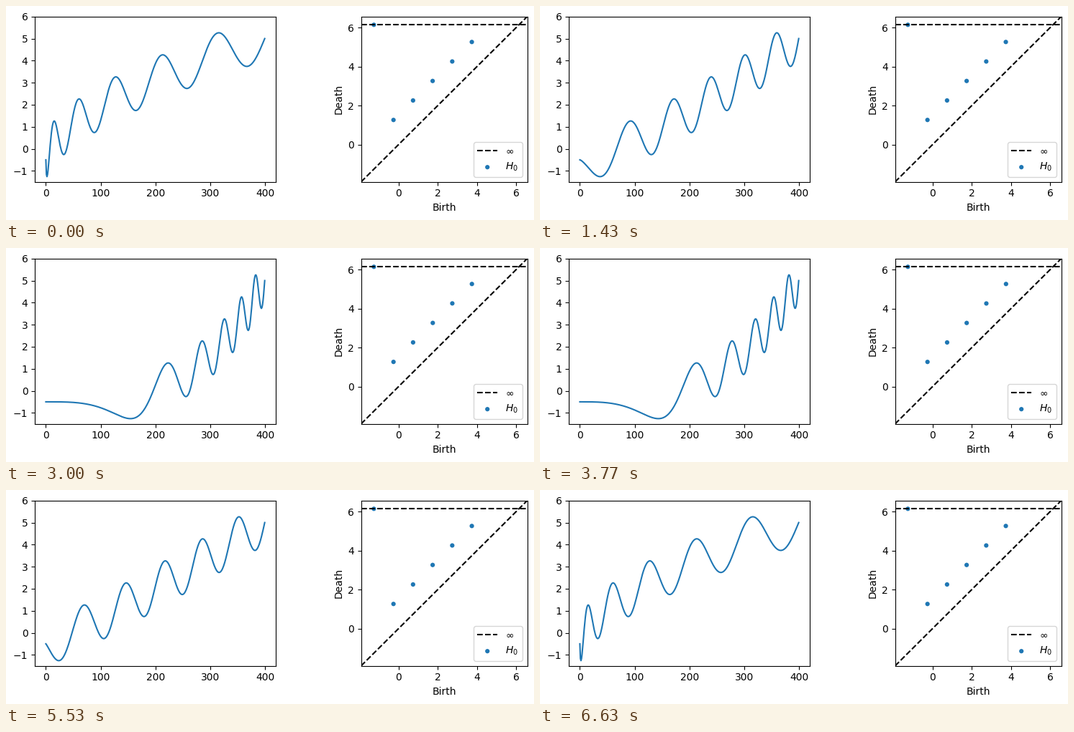
Recreate the animation shown at these times as a matplotlib script. Size 734 by 299 pixels, loop 6.66 s.

```python
import numpy as np
import matplotlib.pyplot as plt
from matplotlib.animation import FuncAnimation

W, H, DPI = 734, 299, 100
LOOP_MS = 6660
SAMPLES = 400
HALF = 100
BLUE = "#1f77b4"

# Warp exponents rise geometrically, then run back.
rise = np.geomspace(0.6, 4, HALF)
powers = np.concatenate([rise, rise[::-1]])
index = np.arange(SAMPLES)
unit = np.linspace(0, 1, SAMPLES)


def signal(power):
    s = 5.5 * unit ** power
    return s - 0.5 - np.sin(2 * np.pi * s)


def persistence(y):
    """Sublevel-set pairs; the first dip is global and never dies."""
    mid, left, right = y[1:-1], y[:-2], y[2:]
    dips = mid[(mid < left) & (mid <= right)]
    peaks = mid[(mid > left) & (mid >= right)]
    return dips[0], dips[1:], peaks


def add_axes(x, y, w, h):
    return fig.add_axes([x / W, y / H, w / W, h / H])


plt.rcParams["font.family"] = "DejaVu Sans"
fig = plt.figure(figsize=(W / DPI, H / DPI), dpi=DPI, facecolor="white")

wave_ax = add_axes(40.2, 53.28, 334.66, 231)
wave, = wave_ax.plot(index, signal(powers[0]), color=BLUE, lw=1.5)
wave_ax.set_xticks(range(0, 401, 100))
wave_ax.set_yticks(range(-1, 7))
margin = 0.05 * (SAMPLES - 1)
wave_ax.set_xlim(-margin, SAMPLES - 1 + margin)
wave_ax.set_ylim(-1.5, 6)

dgm_ax = add_axes(493.63, 53.28, 231, 231)
diagonal, = dgm_ax.plot([0, 1], [0, 1], "--", c="k")
horizon, = dgm_ax.plot([0, 1], [1, 1], "--", c="k", label=r"$\infty$")
dots = dgm_ax.scatter([0], [0], 20, color=BLUE, edgecolor="none", label="$H_0$")
dgm_ax.set_xticks(range(0, 7, 2))
dgm_ax.set_yticks(range(0, 7, 2))
dgm_ax.set_xlabel("Birth")
dgm_ax.set_ylabel("Death")
dgm_ax.legend(loc="lower right")


def update(i):
    y = signal(powers[i])
    wave.set_ydata(y)

    root, births, deaths = persistence(y)
    low, high = root, deaths.max()
    pad = (high - low) / 5
    lim = low - pad / 2, high + pad
    inf = lim[0] + 0.95 * (lim[1] - lim[0])

    dots.set_offsets(np.column_stack([np.append(births, root),
                                      np.append(deaths, inf)]))
    diagonal.set_data(lim, lim)
    horizon.set_data(lim, [inf, inf])
    dgm_ax.set_xlim(lim)
    dgm_ax.set_ylim(lim)
    return wave, dots, diagonal, horizon


anim = FuncAnimation(fig, update, frames=len(powers),
                     interval=LOOP_MS / len(powers), repeat=True, repeat_delay=0)
plt.show()
```
